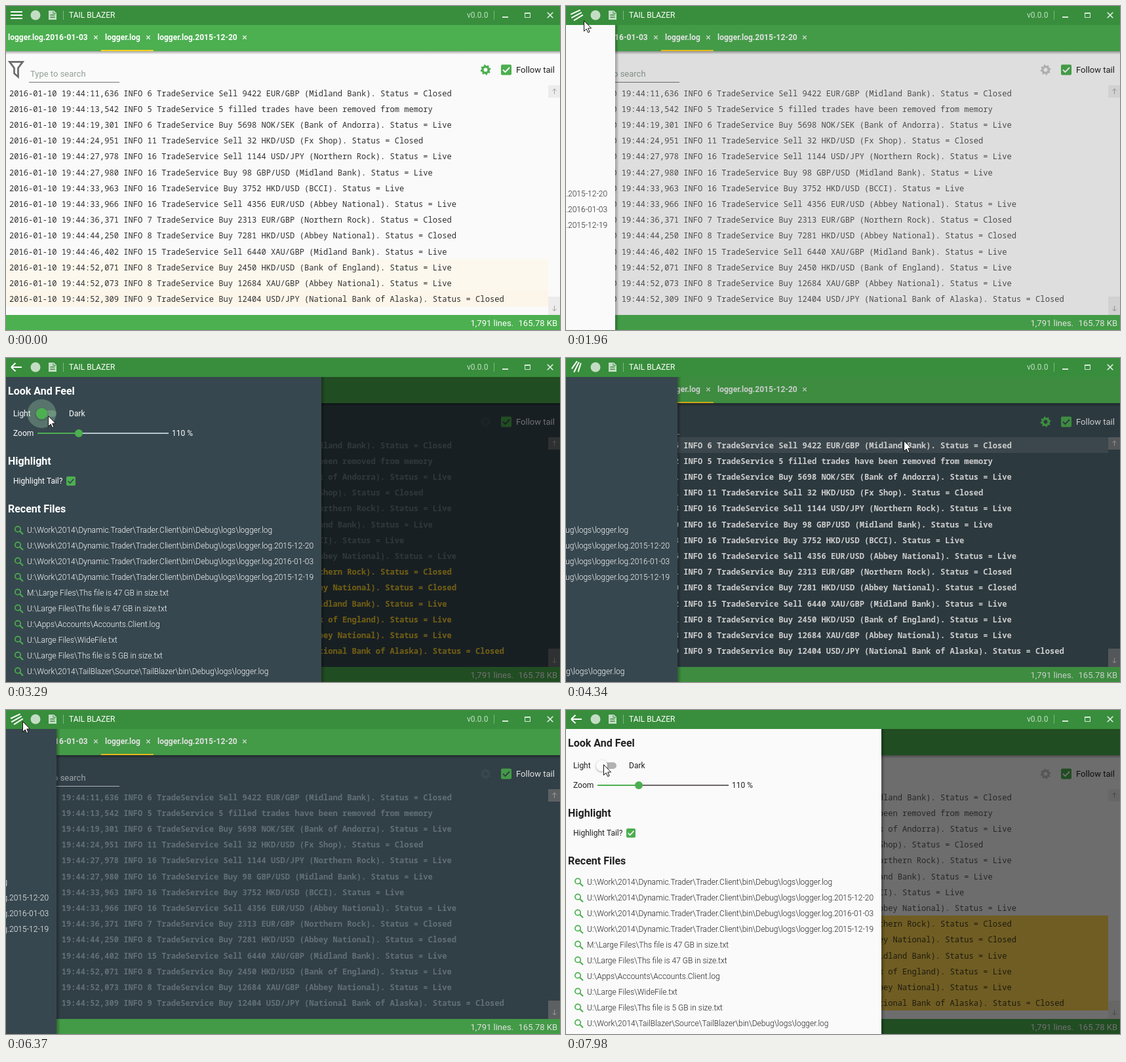
These frames come from a looping animation (845 px wide and 495 px high, 8 s). An HTML page with a canvas:

```html
<!DOCTYPE html>
<html lang="en">
<head>
<meta charset="utf-8">
<title>Tail Blazer</title>
<style>
html, body { margin: 0; width: 100%; height: 100%; overflow: hidden; background: #fafafa; }
canvas { display: block; }
</style>
</head>
<body>
<canvas id="stage" width="845" height="495"></canvas>
<script>
const c = document.getElementById('stage').getContext('2d');
const LOOP = 8000, TICK = 70, TAU = Math.PI * 2;
const GREEN = '#4caf50', MONO = '"Noto Sans Mono", "DejaVu Sans Mono", monospace';
const ROW = 24.2, TOP = 121, DRAWER = 481;

const LIGHT = { dark: false, bg: '#fafafa', ink: '#212121', log: '#303030', dim: '#565656', hint: '#93a097',
  icon: '#6b6b6b', line: '#757575', hover: '#eeeeee', bar: '#ececec', arrow: '#a2a2a2', off: '#c4c4c4', rail: '#6d666a' };
const DARK = { dark: true, bg: '#37474f', ink: '#fff', log: '#fff', dim: '#6f7f86', hint: '#b4bdc1',
  icon: '#bcc4c8', line: '#c3cacd', hover: '#4a595f', bar: '#696d6f', arrow: '#aeb3b5', off: '#40515a', rail: '#b4c6cb' };

const LOG = [
  '11,636 INFO 6 TradeService Sell 9422 EUR/GBP (Midland Bank). Status = Closed',
  '13,542 INFO 5 TradeService 5 filled trades have been removed from memory',
  '19,301 INFO 6 TradeService Buy 5698 NOK/SEK (Bank of Andorra). Status = Live',
  '24,951 INFO 11 TradeService Sell 32 HKD/USD (Fx Shop). Status = Closed',
  '27,978 INFO 16 TradeService Sell 1144 USD/JPY (Northern Rock). Status = Live',
  '27,980 INFO 16 TradeService Buy 98 GBP/USD (Midland Bank). Status = Live',
  '33,963 INFO 16 TradeService Buy 3752 HKD/USD (BCCI). Status = Live',
  '33,966 INFO 16 TradeService Sell 4356 EUR/USD (Abbey National). Status = Live',
  '36,371 INFO 7 TradeService Buy 2313 EUR/GBP (Northern Rock). Status = Closed',
  '44,250 INFO 8 TradeService Buy 7281 HKD/USD (Abbey National). Status = Closed',
  '46,402 INFO 15 TradeService Sell 6440 XAU/GBP (Midland Bank). Status = Live',
  '52,071 INFO 8 TradeService Buy 2450 HKD/USD (Bank of England). Status = Live',
  '52,073 INFO 8 TradeService Buy 12684 XAU/GBP (Abbey National). Status = Live',
  '52,309 INFO 9 TradeService Buy 12404 USD/JPY (National Bank of Alaska). Status = Closed'
].map(s => '2016-01-10 19:44:' + s);

const TRADER = 'U:\\Work\\2014\\Dynamic.Trader\\Trader.Client\\bin\\Debug\\logs\\logger.log';
const FILES = [
  TRADER, TRADER + '.2015-12-20', TRADER + '.2016-01-03', TRADER + '.2015-12-19',
  'M:\\Large Files\\Ths file is 47 GB in size.txt',
  'U:\\Large Files\\Ths file is 47 GB in size.txt',
  'U:\\Apps\\Accounts\\Accounts.Client.log',
  'U:\\Large Files\\WideFile.txt',
  'U:\\Large Files\\Ths file is 5 GB in size.txt',
  'U:\\Work\\2014\\TailBlazer\\Source\\TailBlazer\\bin\\Debug\\logs\\logger.log'
];

// time, x, y of the pointer tip
const PATH = [[910, -14, 215], [1300, 62, 140], [1750, 28, 24], [1820, 27, 22], [2450, 27, 22], [2730, 111, 105],
  [2940, 64, 88], [3780, 64, 88], [4130, 515, 126], [5390, 515, 126], [6090, 25, 17], [6930, 25, 17], [7280, 57, 83]];

const clamp = v => Math.max(0, Math.min(1, v));
const span = (t, a, b) => clamp((t - a) / (b - a));
const smooth = u => u * u * (3 - 2 * u);
const out = u => Math.sin(u * Math.PI / 2);

function rect(x, y, w, h, fill) { c.fillStyle = fill; c.fillRect(x, y, w, h); }
function disc(x, y, r, fill) { c.fillStyle = fill; c.beginPath(); c.arc(x, y, r, 0, TAU); c.fill(); }
function pill(x, y, w, h, r, fill) { c.fillStyle = fill; c.beginPath(); c.roundRect(x, y, w, h, r); c.fill(); }
function poly(points, stroke, width = 2, close = false) {
  c.beginPath();
  points.forEach(p => c.lineTo(p[0], p[1]));
  if (close) c.closePath();
  c.strokeStyle = stroke; c.lineWidth = width; c.stroke();
}
function text(s, x, y, size, fill, weight = 400, align = 'left', family = 'Roboto, sans-serif') {
  c.font = `${weight} ${size}px ${family}`;
  c.fillStyle = fill; c.textAlign = align;
  c.fillText(s, x, y);
}
function fade(alpha, draw) { c.save(); c.globalAlpha = alpha; draw(); c.restore(); }
function cross(x, y, r, color, width) {
  poly([[x - r, y - r], [x + r, y + r]], color, width);
  poly([[x + r, y - r], [x - r, y + r]], color, width);
}
function checkbox(x, y, size, tick) {
  pill(x, y, size, size, 2, GREEN);
  const k = size / 16;
  poly([[x + 3 * k, y + 8 * k], [x + 6.5 * k, y + 11.5 * k], [x + 13 * k, y + 4.5 * k]], tick, 1.9 * k);
}

function pointerAt(t) {
  if (t < 980) return null;
  const i = PATH.findIndex(p => p[0] > t);
  if (i < 0) return PATH[PATH.length - 1].slice(1);
  const a = PATH[i - 1], b = PATH[i], u = smooth(span(t, a[0], b[0]));
  return [a[1] + (b[1] - a[1]) * u, a[2] + (b[2] - a[2]) * u];
}

function stateAt(t) {
  const s = { theme: t >= 3290 && t < 7700 ? DARK : LIGHT, pointer: pointerAt(t) };
  s.enabled = t < 1960 || (t >= 4200 && t < 6370);
  if (t < 4170) s.open = out(span(t, 1920, 2320));
  else if (t < 6300) s.open = 1 - out(span(t, 4170, 4550));
  else s.open = out(span(t, 6330, 6720));
  s.shade = 0.56 * clamp(s.open * 1.3);
  if (t >= 4170 && t < 5320) s.shade = Math.max(0.56 * s.open, 0.06 * (1 - span(t, 4550, 5320)));
  s.knob = t < 7700 ? smooth(span(t, 3290, 3500)) : 1 - smooth(span(t, 7700, 7910));
  return s;
}

function gear(x, y, color, bg) {
  c.fillStyle = color;
  c.beginPath();
  for (let i = 0; i < 32; i++) {
    const a = (i - 1.5) / 32 * TAU, r = i % 4 < 2 ? 8 : 6.2;
    c.lineTo(x + r * Math.cos(a), y + r * Math.sin(a));
  }
  c.fill();
  disc(x, y, 2.9, bg);
}

function scrollButton(y, h, dir, th) {
  rect(827, y, 18, h, th.bar);
  const m = dir < 0 ? y + h / 2 : y + h - 10;
  poly([[836.5, m - 4], [836.5, m + 4]], th.arrow, 1);
  poly([[833.5, m + dir], [836.5, m + 4 * dir], [839.5, m + dir]], th.arrow, 1);
}

function logRows(t, s) {
  const th = s.theme, p = s.pointer;
  const hover = p && s.enabled && p[0] >= 0 && p[0] < 827 ? Math.floor((p[1] - TOP) / ROW) : -1;
  LOG.forEach((line, i) => {
    const y = TOP + Math.floor(i * ROW), fresh = i >= 8;
    const band = fill => rect(0, y, 827, TOP + Math.floor((i + 1) * ROW) - y, fill);
    let color = s.enabled ? th.log : th.dim;
    if (i === hover) band(th.hover);
    if (t < 1750 && i > 10) fade(1 - span(t, 0, 1200), () => band(i === 13 ? '#fcf5e9' : '#fcf8ed'));
    if (t >= 7700 && fresh) {
      band('#ffd54f');
      color = '#423d22';
    }
    const draw = k => text(line, 5, y + 17, 12.1, k, th.dark ? 600 : 400, 'left', MONO);
    draw(color);
    if (th.dark && fresh && t < 4060) fade(1 - span(t, 3290, 4060) ** 2, () => draw('#ffd21f'));
  });
}

function page(t, s) {
  const th = s.theme;
  rect(0, 29, 845, 466, th.bg);
  logRows(t, s);
  scrollButton(121, 19, -1, th);
  scrollButton(444, 28, 1, th);

  poly([[5.5, 85.4], [25.5, 85.4], [18.5, 94.6], [18.5, 108.3], [12.5, 103], [12.5, 94.6]], th.icon, 2.7, true);
  text('Type to search', 37, 108, 13, th.hint);
  rect(35, 116, 138, 1, th.line);
  gear(731.5, 97.5, s.enabled ? GREEN : th.off, th.bg);
  checkbox(755, 89.5, 16, th.bg);
  text('Follow tail', 778, 102, 13, th.ink);

  const shadow = c.createLinearGradient(0, 69, 0, 74);
  shadow.addColorStop(0, 'rgba(0,0,0,.34)');
  shadow.addColorStop(1, 'rgba(0,0,0,0)');
  rect(0, 69, 845, 5, shadow);
  rect(0, 29, 845, 40, GREEN);
  [['logger.log.2016-01-03', 3, 137], ['logger.log', 151, 217], ['logger.log.2015-12-20', 231, 364]].forEach(tab => {
    text(tab[0], tab[1], 52, 12, '#fff', 700);
    cross(tab[2], 48, 2.7, '#e4f3e5', 1.4);
  });
  rect(145, 67, 80, 2, '#ffd21f');

  rect(0, 472, 845, 23, GREEN);
  text('1,791 lines.', 708.5, 489, 13, '#fff');
  text('165.78 KB', 841, 489, 13, '#fff', 400, 'right');
}

function ripple(t, start, x) {
  const age = t - start;
  if (age <= 0 || age > 550) return;
  const u = clamp(age / 280);
  fade(1 - span(age, 300, 550), () => disc(x, 85, 22 * (1 - (1 - u) ** 2), 'rgba(150,200,160,.35)'));
}

function toggle(t, s) {
  const th = s.theme, x = 54.5 + 16.5 * s.knob;
  pill(51, 80, 26, 10, 5, th.dark ? '#58756a' : '#b3b1b3');
  if (t < 2730) fade(1 - span(t, 2240, 2730), () => pill(51, 80, 26, 10, 5, '#a9cdb0'));
  ripple(t, 3010, 54.5);
  ripple(t, 7400, 71);
  c.save();
  c.shadowColor = 'rgba(0,0,0,.35)'; c.shadowBlur = 3; c.shadowOffsetY = 1;
  disc(x, 85, 8.7, th.dark ? GREEN : '#fafafa');
  c.restore();
}

function drawer(t, s) {
  if (s.open < 0.002) return;
  const th = s.theme, ink = th.ink;
  c.save();
  c.translate(Math.round(DRAWER * (s.open - 1)), 0);
  const shadow = c.createLinearGradient(DRAWER, 0, DRAWER + 6, 0);
  shadow.addColorStop(0, 'rgba(0,0,0,.3)');
  shadow.addColorStop(1, 'rgba(0,0,0,0)');
  rect(DRAWER, 29, 6, 466, shadow);
  rect(0, 29, DRAWER, 466, th.bg);

  text('Look And Feel', 3, 56, 16, ink, 700);
  text('Light', 11, 89, 12, ink);
  text('Dark', 96, 89, 12, ink);
  toggle(t, s);
  text('Zoom', 11, 119, 12, ink);
  rect(48, 114, 200, 2, th.rail);
  rect(48, 114, 63, 2, GREEN);
  disc(111, 115, 6, GREEN);
  text('110 %', 253, 119, 12, ink);

  text('Highlight', 3, 163, 16, ink, 700);
  text('Highlight Tail?', 11, 192, 12, ink);
  checkbox(92, 181, 14, th.bg);

  text('Recent Files', 3, 236, 16, ink, 700);
  FILES.forEach((name, i) => {
    const y = 263 + 24 * i;
    c.beginPath(); c.arc(18, y - 1.5, 4.2, 0, TAU);
    c.strokeStyle = GREEN; c.lineWidth = 1.7; c.stroke();
    poly([[21, y + 1.5], [26, y + 6.3]], GREEN, 2.1);
    text(name, 32, y + 4, 12, ink, 300);
  });
  c.restore();
}

function menuIcon(p) {
  const mix = (a, b) => a + (b - a) * p;
  c.save();
  c.translate(16, 14);
  c.rotate(-Math.PI * p);
  poly([[mix(-9, -8), 0], [mix(9, 8), 0]], '#fff', 2);
  [-1, 1].forEach(k => poly([[mix(-9, 1.5), k * mix(5, 6.2)], [mix(9, 8), k * mix(5, 0)]], '#fff', 2));
  c.restore();
}

function titleBar(s) {
  const soft = '#c3ddc5';
  rect(0, 0, 845, 29, '#388e3c');
  menuIcon(s.open);
  disc(45, 14, 7.5, soft);
  c.fillStyle = soft;
  c.beginPath();
  [[65, 7], [73, 7], [77, 11], [77, 21], [65, 21]].forEach(p => c.lineTo(p[0], p[1]));
  c.fill();
  rect(67.5, 13, 7, 1.4, '#388e3c');
  rect(67.5, 16.5, 7, 1.4, '#388e3c');
  poly([[72, 8], [72, 11.5], [76, 11.5]], '#388e3c', 1);
  rect(87, 7, 1, 14, '#7fb782');
  text('TAIL BLAZER', 96, 18, 12, '#fff');
  text('v0.0.0', 703, 18, 12, soft);
  rect(744, 7, 1, 14, '#7fb782');
  rect(757, 16, 9, 2, '#d7e8d8');
  c.strokeStyle = '#d7e8d8'; c.lineWidth = 1;
  c.strokeRect(791.5, 10.5, 8, 7);
  rect(791, 10, 9, 2, '#d7e8d8');
  cross(830, 14, 4.3, '#e3f0e4', 1.6);
}

function pointer(p) {
  if (!p) return;
  c.save();
  c.translate(Math.round(p[0]) + 0.5, Math.round(p[1]) + 0.5);
  c.beginPath();
  [[0, 0], [0, 16], [3.7, 12.5], [6.2, 18], [8.6, 17], [6.2, 11.6], [11, 11.4]].forEach(q => c.lineTo(q[0], q[1]));
  c.closePath();
  c.fillStyle = '#fff'; c.fill();
  c.strokeStyle = '#111'; c.lineWidth = 1; c.stroke();
  c.restore();
}

function render(t) {
  const s = stateAt(t);
  page(t, s);
  if (s.shade > 0) rect(0, 29, 845, 466, `rgba(0,0,0,${s.shade})`);
  drawer(t, s);
  titleBar(s);
  pointer(s.pointer);
}

const begin = performance.now();
function loop() {
  const t = (performance.now() - begin) % LOOP;
  render(Math.floor(t / TICK) * TICK);
  requestAnimationFrame(loop);
}
loop();
</script>
</body>
</html>
```
